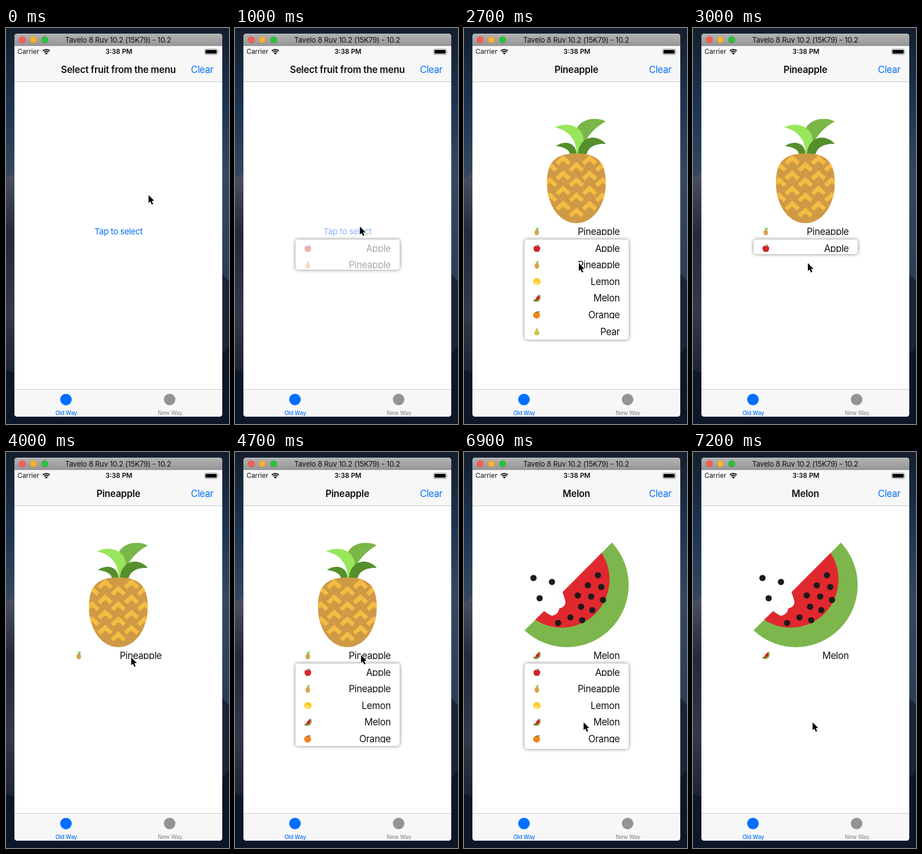
An HTML page for the animation above (8000 ms loop, 398 by 704 pixels).

```html
<!DOCTYPE html>
<html lang="en">
<head>
<meta charset="utf-8">
<title>Fruit menu</title>
<style>
html, body { margin: 0; height: 100%; overflow: hidden; }
svg { display: block; }
text { font: 16.8px Inter, sans-serif; letter-spacing: -.38px; fill: #111; }
.mid { text-anchor: middle; }
.end { text-anchor: end; }
.nav { font-weight: 600; letter-spacing: -.25px; }
.blue { fill: #0870f6; }
.status { font-size: 11.9px; letter-spacing: 0; }
.tab { font-size: 9.9px; font-weight: 500; letter-spacing: -.08px; }
.bar { font-size: 13px; letter-spacing: -.2px; }
#panel { filter: drop-shadow(0 0 3px rgba(0, 0, 0, .5)); }
</style>
</head>
<body>
<svg width="398" height="704" viewBox="0 0 398 704">
  <defs>
    <linearGradient id="sky" x2="0" y2="1">
      <stop stop-color="#141e2e"/><stop offset=".2" stop-color="#1d3552"/>
      <stop offset=".37" stop-color="#34475e"/><stop offset=".64" stop-color="#2b3d54"/><stop offset="1" stop-color="#0e192c"/>
    </linearGradient>
    <linearGradient id="dune" x2="0" y2="1">
      <stop stop-color="#4b5163"/><stop offset=".3" stop-color="#232939"/>
      <stop offset=".7" stop-color="#343848"/><stop offset="1" stop-color="#1c2332"/>
    </linearGradient>
    <linearGradient id="chrome" x2="0" y2="1">
      <stop stop-color="#b4b4b4"/><stop offset="1" stop-color="#959595"/>
    </linearGradient>
    <clipPath id="window"><rect x="15" y="10" width="371" height="681" rx="5"/></clipPath>
    <clipPath id="peel"><use href="#body"/></clipPath>

    <symbol id="Apple" viewBox="108 161 186 186">
      <path fill="#d4252b" d="M201 207C170 188 120 202 122 258C124 310 160 354 201 338C242 354 278 310 280 258C282 202 232 188 201 207Z"/>
      <path fill="none" stroke="#5b4526" stroke-width="9" d="M201 215Q198 190 186 176"/>
      <path fill="#5c913b" d="M202 199Q205 164 252 163Q246 198 202 199Z"/>
    </symbol>
    <symbol id="Pineapple" viewBox="108 161 186 186">
      <path fill="#7ab648" d="M253 166C235 157 208 162 201 179C211 186 215 198 213 209C221 190 235 176 253 166Z"/>
      <path fill="#98e65c" d="M162 177C181 166 215 172 214 204L206 224H201C202 200 186 180 162 177Z"/>
      <path fill="#558f2c" d="M164 210C179 199 200 203 201 224H189C188 216 177 211 164 210ZM253 206C239 190 214 190 205 214L203 224H219C222 211 236 205 253 206Z"/>
      <path id="body" fill="#cf9a45" d="M200.5 223C237 223 253 237 253 276C253 313 232 347 200.500 347C169 347 148 313 148 276C148 237 164 223 200.500 223Z"/>
      <path id="scales" clip-path="url(#peel)" fill="none" stroke="#f4bc42" stroke-width="7.500"/>
    </symbol>
    <symbol id="Lemon" viewBox="108 161 186 186">
      <path fill="#ffcc2d" d="M118 238C132 180 198 156 244 183C280 194 278 223 284 242C304 266 281 283 272 298C244 341 182 345 152 321C116 316 107 280 118 238Z"/>
      <path fill="#ffe27a" d="M126 270C148 247 215 248 232 280C230 325 160 333 140 310Z"/>
    </symbol>
    <symbol id="Melon" viewBox="108 161 186 186">
      <path fill="#7db64c" d="M264 161A110.364 110.364 0 0 1 108 317L143 283L264 161Z"/>
      <path fill="#fff" d="M176 249L143 283L160 293L183 272Z"/>
      <path fill="#e0282f" d="M245.500 179.500A85.500 85.500 0 0 1 127 298L143 283C148 286 151 290 156 291C163 291 169 286 170 278C176 277 181 273 181 267C181 262 178 256 176 249Z"/>
      <g id="seeds" fill="#1d1c1b"/>
    </symbol>
    <symbol id="Orange" viewBox="108 161 186 186">
      <circle cx="196" cy="262" r="82" fill="#f28420"/>
      <path fill="#5c913b" d="M193 198Q208 155 278 174Q249 214 193 198Z"/>
      <path fill="none" stroke="#5b4526" stroke-width="9" d="M194 210Q192 190 180 180"/>
    </symbol>
    <symbol id="Pear" viewBox="108 161 186 186">
      <path fill="#cfc14a" d="M201 186C236 186 224 226 244 254C284 310 247 347 201 347C155 347 118 310 158 254C178 226 166 186 201 186Z"/>
      <path fill="none" stroke="#5b4526" stroke-width="9" d="M201 190Q200 174 207 162"/>
    </symbol>
  </defs>

  <rect width="398" height="704" fill="url(#sky)"/>
  <path fill="url(#dune)" d="M0 267L16 259V612L0 608Z"/>
  <path fill="#1b2336" d="M385 436L398 450V570L385 590Z"/>
  <path fill="#0e1728" d="M0 608L16 613V691H386V580L398 565V704H0Z"/>

  <g clip-path="url(#window)">
    <path fill="#fff" d="M15 10h371v681H15z"/>
    <path fill="url(#chrome)" d="M15 10h371v22H15z"/>
    <path fill="#f7f7f7" d="M15 32h371v63H15zM15 643h371v48H15z"/>
    <path stroke="#c6c6c8" d="M15 95.500h371M15 642.500h371"/>
  </g>
  <g stroke="#0003" stroke-width=".6">
    <circle cx="29" cy="21" r="6" fill="#fc5b54"/>
    <circle cx="49" cy="21" r="6" fill="#fdb42d"/>
    <circle cx="69" cy="21" r="6" fill="#2ac33c"/>
  </g>
  <text class="bar mid" x="200" y="25.700">Tavelo 8 Ruv 10.2 (15K79) - 10.2</text>

  <text class="status" x="20.500" y="46.300">Carrier</text>
  <g fill="none" stroke="#111" stroke-width="2">
    <path d="M65.800 40.700A8.800 8.800 0 0 1 78.200 40.700M68 43.100A5.700 5.700 0 0 1 76 43.100"/>
  </g>
  <path d="M72 47.300L69.600 44.900A3.400 3.400 0 0 1 74.400 44.900Z"/>
  <text class="status mid" x="201.500" y="46.300" style="font-weight:600">3:38 PM</text>
  <rect x="354.500" y="37.500" width="23" height="9.500" rx="2.200" fill="none" stroke="#888"/>
  <rect x="356" y="39" width="20" height="6.500" rx="1"/>
  <path fill="#888" d="M379 40.500q1.800 1.700 0 3.500z"/>

  <text class="nav mid" id="title" x="200.500" y="79.600"></text>
  <text class="blue" x="330" y="79.600">Clear</text>

  <circle cx="107" cy="660.500" r="10.300" fill="#006eff"/>
  <text class="tab blue mid" x="107.500" y="687.600">Old Way</text>
  <circle cx="292" cy="660.500" r="10.300" fill="#949494"/>
  <text class="tab mid" x="293" y="687.600" style="fill:#929292">New Way</text>

  <text class="blue mid" id="prompt" x="201" y="367" style="font-size:14.800px;letter-spacing:-.3px">Tap to select</text>
  <use id="picture" x="108" y="161" width="186" height="186"/>
  <g id="choice"></g>

  <g id="menu">
    <rect id="panel" x="108" y="376" width="186" rx="5" fill="#fff"/>
    <svg id="rows" x="108" y="376" width="186" viewBox="108 376 186 178" preserveAspectRatio="xMidYMin slice"></svg>
  </g>
  <path id="cursor" stroke="#fff" stroke-width="1.800" paint-order="stroke" d="M0 0V14L3.200 11.200L5.600 16.700L8 15.700L5.600 10.300H10Z"/>
</svg>

<script>
const $ = id => document.getElementById(id);
const fruits = ['Apple', 'Pineapple', 'Lemon', 'Melon', 'Orange', 'Pear'];
const MENU_HEIGHT = 178, LOOP = 8000, STEP = 100;

// The label box is too short for descenders, so it crops them.
const row = (name, y) => `
  <use href="#${name}" x="123" y="${y - 7}" width="14" height="14"/>
  <svg x="150" y="${y - 12}" width="130" height="19"><text class="end" x="128" y="18">${name}</text></svg>`;

$('rows').innerHTML = fruits.map((name, i) => row(name, 391.5 + 29.6 * i)).join('');

let scales = '';
for (let col = -2; col <= 2; col++)
  for (let i = 0; i < 4; i++)
    scales += `M${189.5 + 23.5 * col} ${(col % 2 ? 241 : 253) + 27 * i}l11-10 11 10`;
$('scales').setAttribute('d', scales);

$('seeds').innerHTML = [
  [124, 224], [157, 231], [135, 260], [239, 219], [221, 237], [245, 240], [203, 255],
  [227, 257], [248, 263], [209, 275], [229, 281], [190, 294], [211, 299], [168, 304]
].map(([x, y]) => `<circle cx="${x}" cy="${y}" r="5.600"/>`).join('');

// Each move: start time, end time, from, bend, to.
const moves = [
  [0, 400, [254.5, 297], [236, 325], [223, 353]],
  [1500, 2300, [223, 353], [213, 386], [205, 418]],
  [3500, 4100, [205, 418], [214, 388], [225, 361]],
  [5200, 5900, [225, 361], [239, 425], [213, 481]],
  [6000, 6200, [213, 481], [213, 481], [213.5, 480.5]]
];

const progress = (t, a, b) => Math.min(1, Math.max(0, (t - a) / (b - a)));
const ease = (t, a, b) => (1 - Math.cos(Math.PI * progress(t, a, b))) / 2;

function cursorAt(t) {
  const [a, b, from, bend, to] = moves.filter(m => m[0] <= t).pop();
  const u = progress(t, a, b), k = u * u * (3 - 2 * u);
  return from.map((p, i) => p * (1 - k) ** 2 + 2 * bend[i] * k * (1 - k) + to[i] * k * k);
}

let shown;
function showFruit(name) {
  if (name === shown) return;
  shown = name;
  $('title').textContent = name || 'Select fruit from the menu';
  $('picture').setAttribute('href', '#' + name);
  $('choice').innerHTML = name && row(name, 361.5);
  $('prompt').style.display = name ? 'none' : '';
}

function draw(now) {
  const t = Math.floor(now % LOOP / STEP) * STEP;
  showFruit(t < 2600 ? '' : t < 6700 ? 'Pineapple' : 'Melon');

  const opened = t < 3500 ? ease(t, 800, 1340) : ease(t, 4410, 4810);
  const closed = t < 3500 ? ease(t, 2700, 3100) : ease(t, 6800, 7200);
  const height = MENU_HEIGHT * (opened - closed);
  const fade = Math.min(1, opened * 1.2);
  $('menu').style.display = height > .5 ? '' : 'none';
  $('panel').setAttribute('height', Math.max(0, height));
  $('rows').setAttribute('height', Math.max(0, height));
  $('rows').style.opacity = fade;
  $('prompt').style.opacity = t < 700 ? 1 : .2 + .8 * fade;

  $('cursor').setAttribute('transform', `translate(${cursorAt(t)})`);
  requestAnimationFrame(draw);
}
requestAnimationFrame(draw);
</script>
</body>
</html>
```
